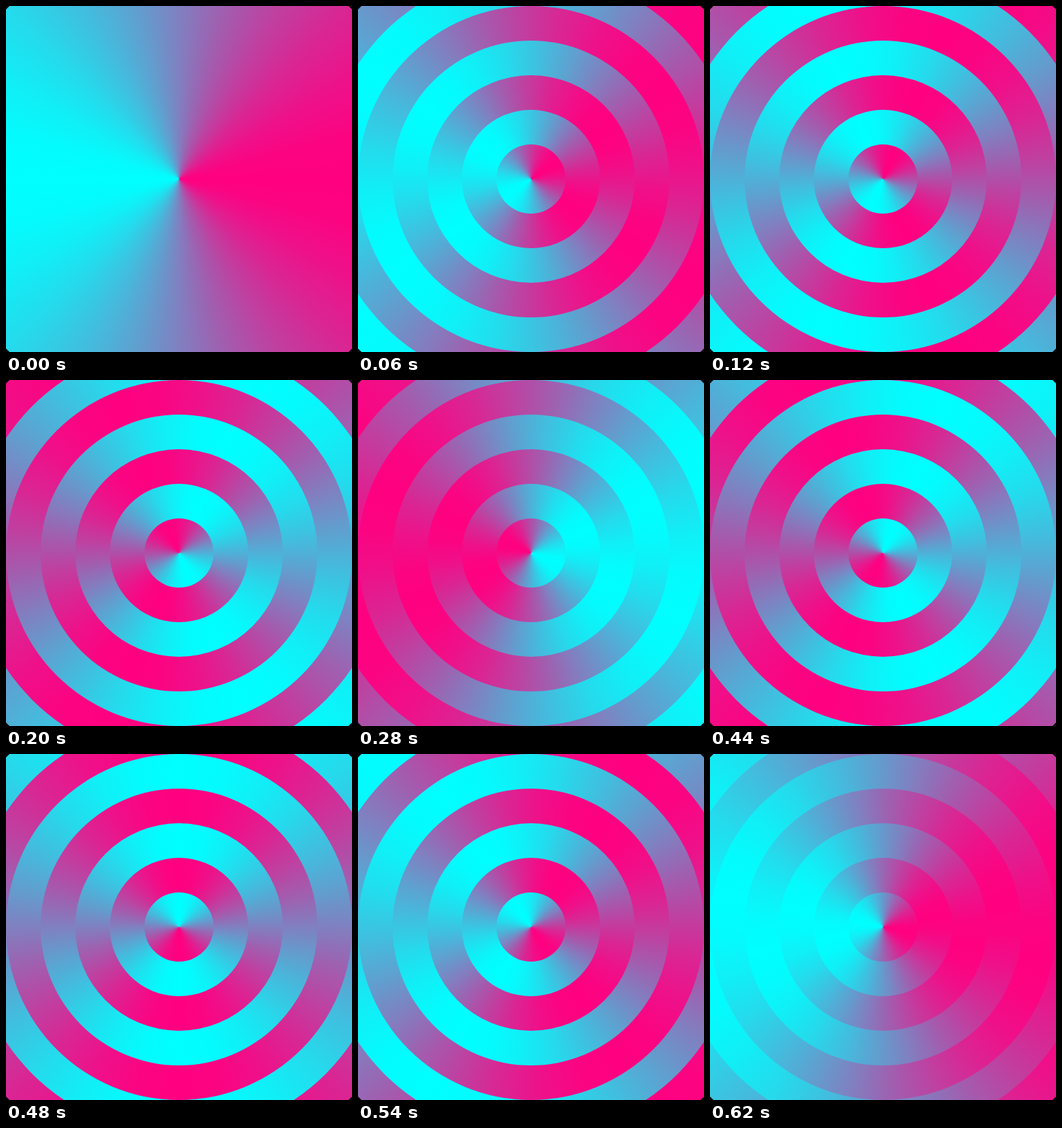
Recreate the animation shown at these times as an HTML page without scripts. Size 500x500 px, loop 0.64 s.

```html
<!DOCTYPE html>
<html lang="en">
<head>
<meta charset="utf-8">
<title>Counter-rotating rings</title>
<style>
  @property --turn {
    syntax: "<angle>";
    inherits: true;
    initial-value: 0deg;
  }

  html, body {
    margin: 0;
    width: 100%;
    height: 100%;
    overflow: hidden;
    background: #000;
  }

  .stage {
    position: relative;
    width: 500px;
    height: 500px;
    overflow: hidden;
    animation: spin 640ms steps(32) infinite;
  }

  /* Evenly spaced stops along a cosine blend from pink to cyan and back */
  .disc {
    --start: calc(90deg - var(--turn));
    position: absolute;
    inset: calc(250px - var(--r));
    border-radius: 50%;
    background: conic-gradient(from var(--start),
      #ff0080, #fb0482, #ee1189, #da2593, #bf40a0, #a15eaf,
      #8080c0, #5ea1d0, #40bfdf, #25daec, #11eef6, #04fbfd,
      #00ffff, #04fbfd, #11eef6, #25daec, #40bfdf, #5ea1d0,
      #8080c0, #a15eaf, #bf40a0, #da2593, #ee1189, #fb0482,
      #ff0080);
  }

  .disc:nth-child(even) { --start: calc(90deg + var(--turn)); }

  @keyframes spin {
    from { --turn: 0deg; }
    to { --turn: 360deg; }
  }
</style>
</head>
<body>
<div class="stage">
  <div class="disc" style="--r: 350px"></div>
  <div class="disc" style="--r: 300px"></div>
  <div class="disc" style="--r: 250px"></div>
  <div class="disc" style="--r: 200px"></div>
  <div class="disc" style="--r: 150px"></div>
  <div class="disc" style="--r: 100px"></div>
  <div class="disc" style="--r: 50px"></div>
</div>
</body>
</html>
```
